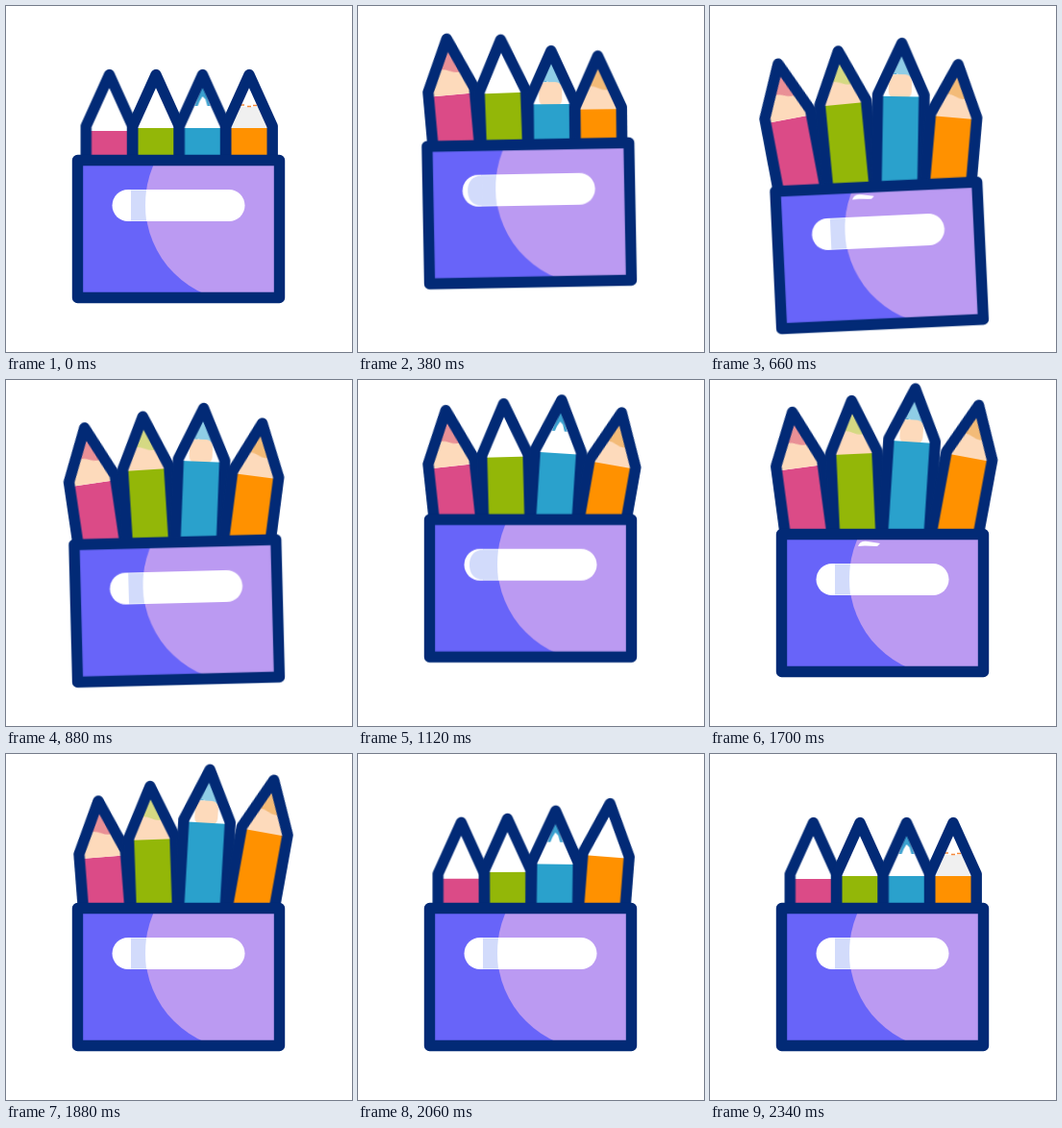
Write an HTML page that moves like this. It is 360 px wide and 360 px high and loops after 2860 ms.

```html
<!DOCTYPE html>
<html lang="en">
<head>
<meta charset="utf-8">
<title>Pencil box</title>
<style>
html, body { margin: 0; width: 100%; height: 100%; overflow: hidden; background: #fff; }
svg { display: block; width: 100vw; height: 100vh; }

.outline { fill: none; stroke: #022a76; stroke-width: 11.4; stroke-linejoin: round; stroke-linecap: round; }
.wood { fill: #fddabb; }

.move { animation: 2860ms cubic-bezier(.37, 0, .63, 1) infinite; }
.show { animation: 2860ms step-end infinite; }
.bob { animation-name: bob; }
.tilt { animation-name: tilt; }
.pink { animation-name: pink; transform-origin: 0 -13px; }
.green { animation-name: green; transform-origin: 0 0; }
.blue { animation-name: blue; transform-origin: 0 -60px; }
.orange { animation-name: orange; transform-origin: 0 -40px; }
.long { animation-name: long; }
.mid { animation-name: mid; }
.short { animation-name: short; }
.idle { animation-name: idle; }
.glint { animation-name: glint; }
.shade { animation-name: shade; }

@keyframes bob {
  0%, 4.895% { transform: translateY(0); }
  13.287% { transform: translateY(-16.3px); }
  24.476% { transform: translateY(29px); }
  37.762% { transform: translateY(-16px); }
  48.951%, 100% { transform: translateY(0); }
}
@keyframes tilt {
  0%, 4.895% { transform: rotate(0deg); }
  24.476% { transform: rotate(-2.7deg); }
  37.762%, 100% { transform: rotate(0deg); }
}
@keyframes pink {
  0%, 4.895% { transform: rotate(0deg) translateY(0); }
  21.678% { transform: rotate(-8.1deg) translateY(-45.5px); }
  38.112% { transform: rotate(-6.1deg) translateY(-25px); }
  48.951% { transform: rotate(-8.5deg) translateY(-41px); }
  60.14% { transform: rotate(-7.6deg) translateY(-39.5px); }
  72.727%, 100% { transform: rotate(0deg) translateY(0); }
}
@keyframes green {
  0%, 6.119% { transform: rotate(0deg) translateY(0); }
  23.077% { transform: rotate(-2.8deg) translateY(-54px); }
  38.462% { transform: rotate(-1.5deg) translateY(-31.3px); }
  50.35% { transform: rotate(-3deg) translateY(-52px); }
  61.538% { transform: rotate(-2.6deg) translateY(-50px); }
  74.476%, 100% { transform: rotate(0deg) translateY(0); }
}
@keyframes blue {
  0%, 9.79% { transform: rotate(0deg) translateY(0); }
  24.476% { transform: rotate(3.7deg) translateY(-60.5px); }
  38.462% { transform: rotate(3.7deg) translateY(-35.3px); }
  51.049% { transform: rotate(3.8deg) translateY(-64px); }
  62.937% { transform: rotate(3.7deg) translateY(-62.5px); }
  75.874%, 100% { transform: rotate(0deg) translateY(0); }
}
@keyframes orange {
  0%, 11.189% { transform: rotate(0deg) translateY(0); }
  25.874% { transform: rotate(8.3deg) translateY(-38.5px); }
  38.811% { transform: rotate(10deg) translateY(-24px); }
  51.748% { transform: rotate(10.8deg) translateY(-49px); }
  65.035% { transform: rotate(10.3deg) translateY(-47px); }
  77.972%, 100% { transform: rotate(0deg) translateY(0); }
}

@keyframes long {
  0%, 66.43% { opacity: 0; }
  6.993% { opacity: 1; }
}
@keyframes mid {
  0%, 34.97%, 66.43% { opacity: 0; }
  12%, 45.45% { opacity: 1; }
}
@keyframes short {
  0%, 34.97%, 66.43% { opacity: 0; }
  16.78%, 45.45% { opacity: 1; }
}
@keyframes idle {
  0%, 75.5% { opacity: 1; }
  6.993% { opacity: 0; }
}
@keyframes glint {
  0%, 28%, 63% { opacity: 0; }
  20%, 54.5% { opacity: 1; }
}
@keyframes shade {
  0%, 19.6%, 45% { opacity: 0; }
  10.5%, 35% { opacity: 1; }
}
</style>
</head>
<body>
<svg viewBox="0 0 360 360">
  <defs>
    <path id="body" d="M-24.2 -83H24.2V45H-24.2Z"/>
    <path id="tip" d="M0 -138.5L24.2 -85V-80H-24.2V-85Z"/>
    <path id="lead" d="M0 -138.5L15.2 -105Q8 -101 0 -105T-15.2 -105Z"/>
    <path id="edge" d="M-24.2 45V-85L0 -138.5L24.2 -85V45Z"/>
    <clipPath id="inside"><path d="M74.5 160.5H284.5V303.5H74.5Z"/></clipPath>
  </defs>

  <g transform="translate(179.5 303.5)"><g class="move bob"><g class="move tilt"><g transform="translate(-179.5 -303.5)">

    <g transform="translate(107.5 210)"><g class="move pink">
      <use href="#tip" fill="#fff"/>
      <g class="show long"><use href="#tip" class="wood"/><use href="#lead" fill="#e99096"/></g>
      <use href="#body" y="3" fill="#db4b87"/>
      <use href="#edge" class="outline"/>
    </g></g>

    <g transform="translate(156 210)"><g class="move green">
      <use href="#tip" fill="#fff"/>
      <g class="show short"><use href="#tip" class="wood"/><use href="#lead" fill="#d5d983"/></g>
      <use href="#body" fill="#93b708"/>
      <use href="#edge" class="outline"/>
    </g></g>

    <g transform="translate(204.5 210)"><g class="move blue">
      <use href="#tip" fill="#fff"/>
      <path fill="#3aa0cf" d="M0 -128L8 -106H5L3 -113L0 -116L-3 -111L-5 -106H-8Z"/>
      <g class="show mid">
        <use href="#lead" fill="#8fcde6"/>
        <rect class="wood" x="-13" y="-106" width="24" height="25" rx="7"/>
      </g>
      <use href="#body" fill="#2aa1cc"/>
      <use href="#edge" class="outline"/>
    </g></g>

    <g transform="translate(253 210)"><g class="move orange">
      <use href="#tip" fill="#fff"/>
      <g class="show idle">
        <path fill="#f0f0f0" d="M-15 -105H15L24.2 -85V-80H-24.2V-85Z"/>
        <path fill="none" stroke="#f58a3c" stroke-width="1.5" d="M-9 -107H-5M-2 -105.5H2M4 -106.5H8"/>
      </g>
      <g class="show long"><use href="#tip" class="wood"/><use href="#lead" fill="#f3bb78"/></g>
      <use href="#body" fill="#ff9100"/>
      <use href="#edge" class="outline"/>
    </g></g>

    <g clip-path="url(#inside)">
      <path fill="#6864f9" d="M74 160H285V304H74Z"/>
      <circle cx="247" cy="206" r="102" fill="#bb9af2"/>
      <path class="show glint" fill="#fff" d="M154 173Q156 167 164 168L177 170L174 173L161 172.5Z"/>
    </g>
    <rect x="110.5" y="191" width="138" height="33" rx="16.5" fill="#fff"/>
    <path fill="#d2dbfb" d="M130 191.5H146Q144 207 146 223.5H130Z"/>
    <path class="show shade" fill="#d2dbfb" d="M131 192H127Q116 195 116 207.5T127 223H131Z"/>
    <path class="outline" d="M74.5 160.5H284.5V303.5H74.5Z"/>

  </g></g></g></g>
</svg>
</body>
</html>
```
